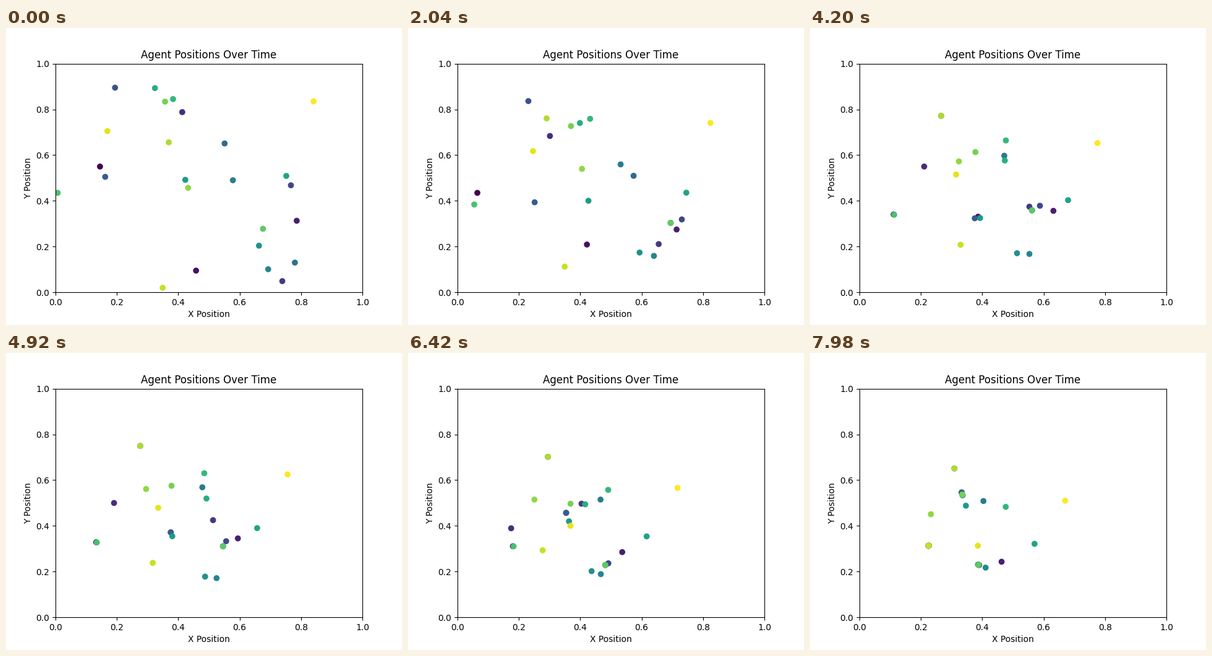
Animation of 640 by 480 pixels, one loop 8 s. Source, as a matplotlib script:

```python
import numpy as np
import matplotlib.pyplot as plt
from matplotlib.animation import FuncAnimation

TICK = 20            # ms per animation frame
HOLD = 3             # frames per simulation step
LOOP = 8000          # ms
FRAMES = LOOP // TICK
STEPS = (FRAMES - 1) // HOLD + 1

# Start state of each agent: x, y, speed (thousandths per step), agent it chases
AGENTS = [
    (0.145, 0.550, 4.20, 17), (0.458, 0.095, 3.52, 6), (0.786, 0.313, 3.33, 18),
    (0.413, 0.788, 4.50, 0), (0.739, 0.049, 5.36, 19), (0.767, 0.468, 4.70, 9),
    (0.194, 0.895, 2.04, 11), (0.162, 0.505, 4.20, 1), (0.551, 0.651, 4.22, 12),
    (0.780, 0.130, 5.70, 8), (0.578, 0.490, 2.46, 15), (0.693, 0.101, 2.42, 12),
    (0.663, 0.204, 2.24, 22), (0.423, 0.492, 2.70, 1), (0.752, 0.509, 2.18, 9),
    (0.324, 0.893, 5.00, 4), (0.383, 0.845, 2.92, 9), (0.007, 0.435, 2.05, 22),
    (0.676, 0.278, 6.00, 9), (0.357, 0.834, 3.17, 1), (0.432, 0.457, 2.59, 3),
    (0.369, 0.656, 3.85, 6), (0.349, 0.020, 2.72, 3), (0.169, 0.705, 3.43, 12),
    (0.841, 0.835, 2.82, 9),
]


def advance(pos):
    """Let the agents step in turn towards their targets, never past them."""
    pos = pos.copy()
    for i, (_, _, speed, target) in enumerate(AGENTS):
        gap = pos[target] - pos[i]
        dist = np.hypot(*gap)
        if dist > 0:
            pos[i] += gap * min(1, speed / 1000 / dist)
    return pos


path = [np.array([agent[:2] for agent in AGENTS])]
while len(path) < STEPS:
    path.append(advance(path[-1]))

fig, ax = plt.subplots(figsize=(6.4, 4.8), dpi=100)
dots = ax.scatter(*path[0].T, c=range(len(AGENTS)), cmap="viridis")
ax.set(xlim=(0, 1), ylim=(0, 1), title="Agent Positions Over Time",
       xlabel="X Position", ylabel="Y Position")


def update(frame):
    dots.set_offsets(path[frame // HOLD])
    return (dots,)


def init():
    return update(0)


anim = FuncAnimation(fig, update, frames=FRAMES, init_func=init,
                     interval=TICK, repeat=True, repeat_delay=0)
plt.show()
```
